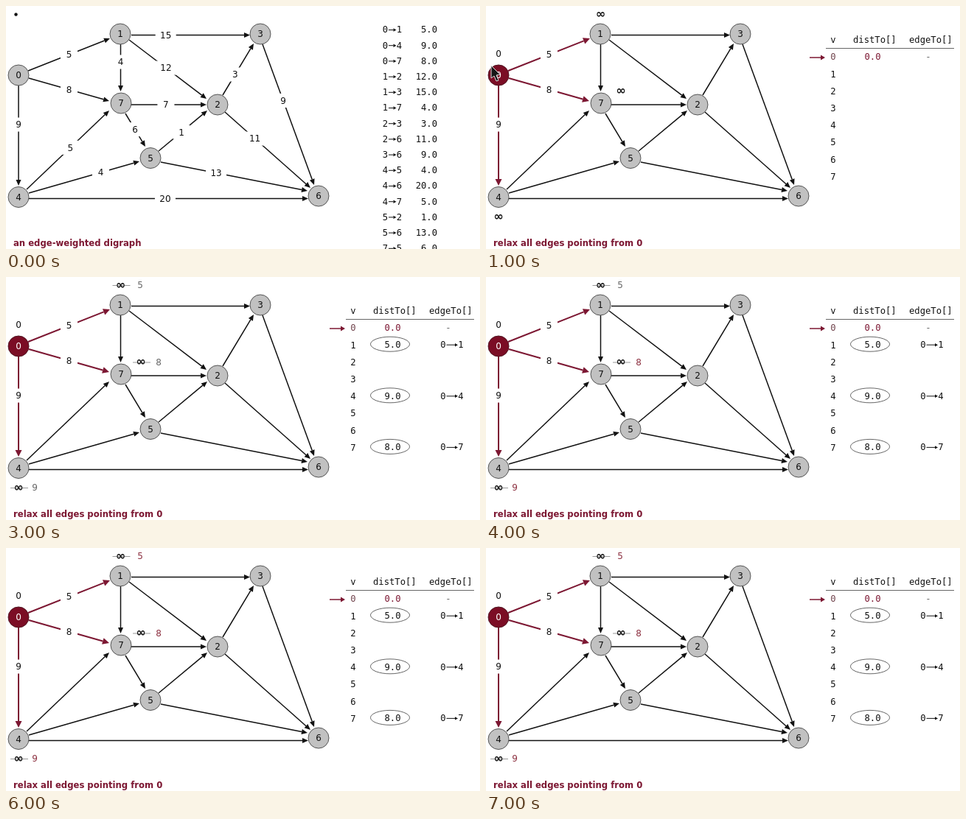
These frames come from a looping animation (643x330 px, 8 s). An HTML page with a canvas:

```html
<!DOCTYPE html>
<html lang="en">
<head>
<meta charset="utf-8">
<title>Shortest paths: relaxing edges</title>
<style>
html, body { margin: 0; width: 100%; height: 100%; overflow: hidden; background: #fff; }
canvas { display: block; }
</style>
</head>
<body>
<canvas id="stage" width="643" height="330"></canvas>
<script>
const ctx = document.getElementById('stage').getContext('2d');
const LOOP = 8000;
const INK = '#111', RED = '#7c1732', GREY = '#666';
const SANS = '12px "DejaVu Sans", sans-serif';
const BOLD = 'bold 11.65px "DejaVu Sans", sans-serif';
const MONO = '12.2px "DejaVu Sans Mono", monospace';
const INFINITY_FONT = 'bold 16px "DejaVu Sans", sans-serif';

const nodes = [[17, 94], [155, 38], [287, 134], [345, 38], [17, 259.5], [196, 206.5], [424, 258], [156, 132]];

// from, to, weight, x1, y1, x2, y2, label position along the edge
const edges = [
  [0, 1, 5, 30, 88, 141, 44, 0.5],
  [0, 4, 9, 17, 108, 17, 244, 0.39],
  [0, 7, 8, 31, 98, 140, 129, 0.5],
  [1, 2, 12, 167, 46, 272, 126, 0.476],
  [1, 3, 15, 170, 39.5, 331, 39.5, 0.29],
  [1, 7, 4, 155.5, 52, 155.5, 116, 0.375],
  [2, 3, 3, 294, 121, 336, 51, 0.4],
  [2, 6, 11, 297, 144, 413, 247, 0.35],
  [3, 6, 9, 348, 52, 418, 243, 0.4],
  [4, 5, 4, 31, 254, 181, 211, 0.65],
  [4, 6, 20, 31, 261.5, 410, 261.5, 0.488],
  [4, 7, 5, 28, 249, 140, 142, 0.53],
  [5, 2, 1, 207, 197, 273, 142, 0.47],
  [5, 6, 13, 210, 212, 409, 251, 0.377],
  [7, 5, 6, 162, 146, 189, 191, 0.48],
  [7, 2, 7, 170, 134, 272, 134, 0.46]
];

// Tentative distances: x and y of the infinity sign, x of the new value
const tentative = [[1, 155.5, 11, 182], [7, 183, 115.5, 207], [4, 17, 286, 39]];

function text(str, x, y, font = SANS, color = INK, align = 'center') {
  ctx.font = font;
  ctx.fillStyle = color;
  ctx.textAlign = align;
  ctx.fillText(str, x, y + 4.4);
}

function line(x1, y1, x2, y2, color, width) {
  ctx.strokeStyle = color;
  ctx.lineWidth = width;
  ctx.beginPath();
  ctx.moveTo(x1, y1);
  ctx.lineTo(x2, y2);
  ctx.stroke();
}

function arrow(x1, y1, x2, y2, color, width, length, half) {
  const a = Math.atan2(y2 - y1, x2 - x1), c = Math.cos(a), s = Math.sin(a);
  const bx = x2 - length * c, by = y2 - length * s;
  line(x1, y1, bx, by, color, width);
  ctx.fillStyle = color;
  ctx.beginPath();
  ctx.moveTo(x2, y2);
  ctx.lineTo(bx - half * s, by + half * c);
  ctx.lineTo(bx + half * s, by - half * c);
  ctx.fill();
}

function drawEdge([from, , weight, x1, y1, x2, y2, t], relaxing) {
  const active = relaxing && from === 0;
  if (active) arrow(x1, y1, x2, y2, RED, 2, 9, 4.5);
  else arrow(x1, y1, x2, y2, INK, 1.5, 8, 3.5);
  if (relaxing && !active) return;
  const x = x1 + (x2 - x1) * t, y = y1 + (y2 - y1) * t;
  const w = weight > 9 ? 28 : 23;
  ctx.fillStyle = '#fff';
  ctx.fillRect(x - w / 2, y - 9.5, w, 19);
  text(weight, x, y);
}

function drawNode([x, y], id, active) {
  ctx.beginPath();
  ctx.arc(x, y, 14, 0, Math.PI * 2);
  ctx.fillStyle = active ? '#7b0d25' : '#c1c1c1';
  ctx.fill();
  ctx.strokeStyle = active ? '#4d1420' : '#555';
  ctx.lineWidth = 1;
  ctx.stroke();
  text(id, x, y, SANS, active ? '#fff' : INK);
}

function drawPair(from, to, x, y, spread) {
  text(from, x - spread, y, MONO);
  text(to, x + spread, y, MONO);
  arrow(x - spread + 4.5, y + 0.5, x + spread - 4, y + 0.5, INK, 1, 4, 2.2);
}

function drawEdgeList() {
  edges.forEach(([from, to, weight], i) => {
    const y = 32 + i * 21.2;
    drawPair(from, to, 524, y, 9.5);
    text(weight.toFixed(1), 585, y, MONO, INK, 'right');
  });
}

function drawTable(relaxed) {
  text('v', 471, 46, MONO);
  text('distTo[]', 498, 46, MONO, INK, 'left');
  text('edgeTo[]', 574, 46, MONO, INK, 'left');
  line(461, 57.5, 635, 57.5, GREY, 1);
  arrow(439, 70, 460, 70, RED, 1.5, 6, 3.5);
  nodes.forEach((_, v) => text(v, 471, 69 + v * 23.2, MONO, v ? INK : '#70434c'));
  text('0.0', 524.5, 69, MONO, RED);
  text('-', 600, 69, MONO, GREY);
  if (!relaxed) return;
  for (const [from, to, weight] of edges.slice(0, 3)) {
    const y = 68.5 + to * 23.2;
    ctx.strokeStyle = GREY;
    ctx.lineWidth = 1;
    ctx.beginPath();
    ctx.ellipse(521, y - 0.5, 26.5, 10, 0, 0, Math.PI * 2);
    ctx.stroke();
    text(weight.toFixed(1), 524.5, y, MONO);
    drawPair(from, to, 605, y, 12);
  }
}

function drawDistances(time, relaxed) {
  text(0, 17, 65);
  for (const [node, x, y, valueX] of tentative) {
    if (relaxed) line(x - 11, y + 0.5, x + 13, y + 0.5, '#999', 1);
    text('∞', x, y + 0.5, INFINITY_FONT);
    if (!relaxed) continue;
    const weight = edges.find(e => e[0] === 0 && e[1] === node)[2];
    const redFrom = node === 1 ? 6000 : 4000;
    text(weight, valueX, y, SANS, time < redFrom ? GREY : '#8c3040');
  }
}

function drawCursor() {
  ctx.beginPath();
  [[7, 81], [7, 98], [11, 95], [14, 102], [17, 101], [14, 94], [19, 93]]
    .forEach(([x, y]) => ctx.lineTo(x, y));
  ctx.closePath();
  ctx.fillStyle = '#161616';
  ctx.fill();
  ctx.strokeStyle = '#ddd';
  ctx.lineWidth = 1;
  ctx.stroke();
}

function draw(time) {
  const relaxing = time >= 1000, relaxed = time >= 3000;
  ctx.fillStyle = '#fff';
  ctx.fillRect(0, 0, 643, 330);
  edges.forEach(edge => drawEdge(edge, relaxing));
  nodes.forEach((node, id) => drawNode(node, id, relaxing && id === 0));
  if (relaxing) {
    drawTable(relaxed);
    drawDistances(time, relaxed);
    if (!relaxed) drawCursor();
  } else {
    drawEdgeList();
    ctx.fillStyle = INK;
    ctx.beginPath();
    ctx.arc(13.5, 11.5, 2.2, 0, Math.PI * 2);
    ctx.fill();
  }
  const caption = relaxing ? 'relax all edges pointing from 0' : 'an edge-weighted digraph';
  text(caption, 10, 321.5, BOLD, RED, 'left');
}

const start = performance.now();
function tick() {
  draw((performance.now() - start) % LOOP);
  requestAnimationFrame(tick);
}
tick();
</script>
</body>
</html>
```
